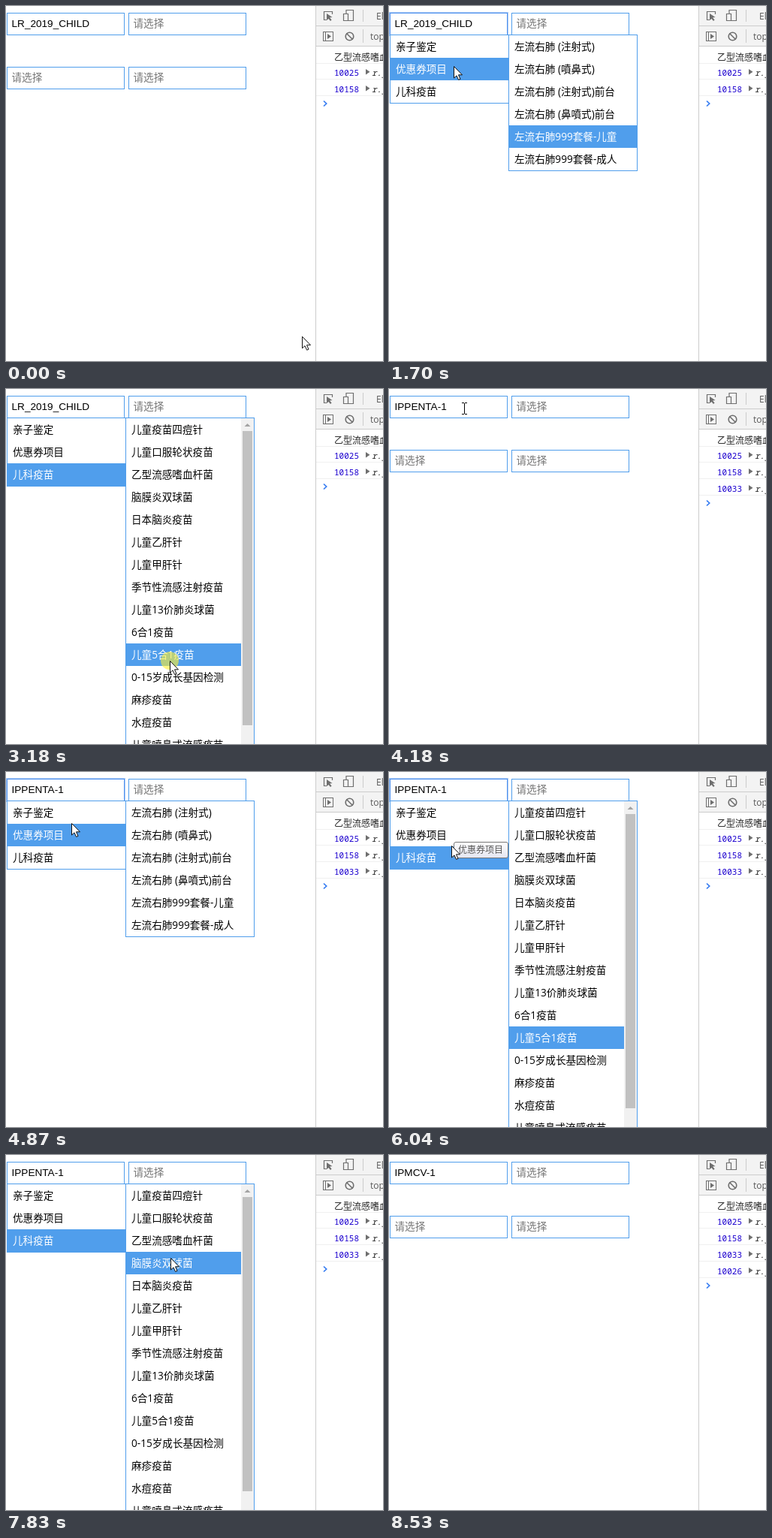
Animation of 502 by 473 pixels, one loop 9470 ms. Source, as an HTML page with a canvas:

```html
<!DOCTYPE html>
<html lang="zh-CN">
<head>
<meta charset="utf-8">
<title>Cascading select</title>
<style>
  html, body { margin: 0; width: 100%; height: 100%; overflow: hidden; background: #fff; }
  canvas { display: block; }
</style>
</head>
<body>
<canvas id="stage" width="502" height="473"></canvas>
<script>
const ctx = document.getElementById('stage').getContext('2d');
const LOOP = 9470, TICK = 77, ROW = 30, MENU_TOP = 38;
const BLUE = '#509eec', INK = '#6e6e6e', RULE = '#ccc';
const UI = '"Open Sans", "Noto Sans CJK SC", "Noto Sans CJK", sans-serif';
const ITEM_FONT = '13.6px ' + UI;
const FIELD_FONT = '13.6px "Liberation Sans", "Noto Sans CJK SC", "Noto Sans CJK", sans-serif';
const SMALL_FONT = '12px ' + UI;
const MONO = '11px "Noto Sans Mono", monospace';

const groups = ['亲子鉴定', '优惠券项目', '儿科疫苗'];
const children = [
  [],
  ['左流右肺 (注射式)', '左流右肺 (噴鼻式)', '左流右肺 (注射式)前台',
   '左流右肺 (鼻噴式)前台', '左流右肺999套餐-儿童', '左流右肺999套餐-成人'],
  ['儿童疫苗四痘针', '儿童口服轮状疫苗', '乙型流感嗜血杆菌', '脑膜炎双球菌', '日本脑炎疫苗',
   '儿童乙肝针', '儿童甲肝针', '季节性流感注射疫苗', '儿童13价肺炎球菌', '6合1疫苗', '儿童5合1疫苗',
   '0-15岁成长基因检测', '麻疹疫苗', '水痘疫苗', '儿童喷鼻式流感疫苗']
];
const picks = [
  { code: 'LR_2019_CHILD', item: '左流右肺999套餐-儿童' },
  { code: 'IPPENTA-1', item: '儿童5合1疫苗' },
  { code: 'IPMCV-1', item: '脑膜炎双球菌' }
];
const logged = ['10025', '10158', '10033', '10026'];

// Each session opens the menu, then closes it with a new pick.
const sessions = [
  { open: 1100, close: 3410 },
  { open: 4490, close: 7930, tipFrom: 7130, tipTo: 7680 }
];
const groupTip = { from: 5400, to: 6420 };

// Pointer glides: first step, last step, destination
const glides = [
  [70, 390, 82, 40], [540, 680, 86, 23], [1700, 1700, 86, 80], [1800, 2020, 102, 167],
  [2170, 2860, 218, 362], [3560, 4180, 100, 25], [4640, 4930, 86, 73], [5640, 5720, 83, 96],
  [6040, 6040, 83, 98], [6420, 6830, 219, 137], [8380, 8455, 334, 403]
];
const POINTER_GONE = 8530;

const within = (t, from, to) => t >= from && t < to;

function pointerAt(t) {
  let x = 394, y = 440;
  for (const [start, end, toX, toY] of glides) {
    if (t < start) break;
    const steps = Math.round((end - start) / TICK) + 1;
    const gap = (end - start) / (steps - 1) || 1;
    const p = Math.min(1, (Math.floor((t - start) / gap + 1e-6) + 1) / steps);
    const eased = p * p * (3 - 2 * p);
    x += (toX - x) * eased;
    y += (toY - y) * eased;
  }
  return { x: Math.round(x), y: Math.round(y) };
}

const rowAt = y => Math.floor((y - MENU_TOP) / ROW);

// The last group the pointer crossed since the menu opened stays active.
function activeGroup(opened, t) {
  let group = -1;
  for (let s = opened; s < t + 10; s += 10) {
    const { x, y } = pointerAt(Math.min(s, t));
    if (x < 160 && rowAt(y) in groups) group = rowAt(y);
  }
  return group;
}

function rect(x, y, w, h, color) {
  ctx.fillStyle = color;
  ctx.fillRect(x, y, w, h);
}

function frame(x, y, w, h, color) {
  ctx.strokeStyle = color;
  ctx.lineWidth = 1;
  ctx.strokeRect(x + 0.5, y + 0.5, w - 1, h - 1);
}

function label(text, x, y, font, color) {
  ctx.font = font;
  ctx.fillStyle = color;
  ctx.fillText(text, x, y);
}

function shape(path, x, y, fill, stroke, width = 1) {
  const outline = new Path2D(path);
  ctx.save();
  ctx.translate(x, y);
  if (fill) { ctx.fillStyle = fill; ctx.fill(outline); }
  if (stroke) { ctx.strokeStyle = stroke; ctx.lineWidth = width; ctx.stroke(outline); }
  ctx.restore();
}

function drawField(x, y, text, hasFocus) {
  frame(x, y, 157, 30, BLUE);
  if (hasFocus) {
    frame(x - 1, y - 1, 159, 32, '#a9c9f5');
    frame(x, y, 157, 30, '#4d90ee');
  }
  label(text || '请选择', x + 6.5, y + 19, FIELD_FONT, text ? '#000' : '#757575');
}

function drawMenu(x, w, items, active, textX) {
  const scrolls = items.length * ROW + MENU_TOP > 473;
  const h = items.length * ROW + 2;
  rect(x, MENU_TOP, w, h, '#fff');
  items.forEach((item, i) => {
    const y = MENU_TOP + 1 + i * ROW;
    if (i === active) rect(x + 1, y, w - (scrolls ? 18 : 2), ROW, BLUE);
    label(item, textX, y + 20, ITEM_FONT, i === active ? '#fff' : '#000');
  });
  if (scrolls) {
    rect(313, 39, 17, 434, '#f1f1f1');
    rect(315, 56, 13, 392, '#c1c1c1');
    shape('M-4 4 L0 0 L4 4Z', 321.5, 46, '#a3a3a3');
  }
  frame(x, MENU_TOP, w, h, BLUE);
}

function drawMenus(group, pick, pointer) {
  drawMenu(1, 159, groups, group, 9);
  if (group < 1) return;
  const items = children[group];
  const active = pointer.x >= 160 ? rowAt(pointer.y) : items.indexOf(pick.item);
  drawMenu(159, 172, items, active, 167);
}

function drawToolbar() {
  rect(413, 0, 89, 53, '#f3f3f3');
  rect(413, 26, 89, 1, RULE);
  rect(413, 53, 89, 1, RULE);
  rect(475, 5, 1, 16, RULE);
  rect(475, 31, 1, 18, RULE);
  // Inspect
  shape('M4 11.5H.5V.5H11.5V4', 423, 7, null, INK, 1.2);
  shape('M0 0V9L2.5 7L5 10L6.6 8.6L4 5.6L7.5 5Z', 427, 10, INK);
  // Devices
  shape('M.5 5.5H6.5V14.5H.5Z M4 5V.5H13.5V14.5H7', 449, 5, null, INK, 1.2);
  // Sidebar toggle
  frame(422, 34, 14, 13, INK);
  rect(425, 34, 1, 13, INK);
  shape('M0 0L5 3.5L0 7Z', 428, 37, INK);
  // Clear
  ctx.beginPath();
  ctx.arc(457.5, 40.5, 5.3, 0, Math.PI * 2);
  ctx.strokeStyle = INK;
  ctx.lineWidth = 1.6;
  ctx.stroke();
  shape('M-4 -4L4 4', 457.5, 40.5, null, INK, 1.6);
  label('Elements', 493, 18, SMALL_FONT, '#5a5a5a');
  label('top', 485, 45, SMALL_FONT, '#5a5a5a');
}

function drawConsole(count) {
  drawToolbar();
  label('乙型流感嗜血杆菌', 437, 72.5, SMALL_FONT, '#222');
  rect(413, 76, 89, 1, '#f0f0f0');
  for (let i = 0; i < count; i++) {
    const y = 93 + i * 22;
    label(logged[i], 437, y, MONO, '#1c00cf');
    shape('M0 0L5.5 3.8L0 7.5Z', 479, y - 9, INK);
    label('r.j', 487, y, 'italic ' + MONO, '#222');
    rect(413, y + 4, 89, 1, '#f0f0f0');
  }
  shape('M0 -3.5L3.7 0L0 3.5', 423, 86 + count * 22, null, '#367cf1', 1.7);
  rect(412, 0, 1, 473, RULE);
}

function drawTip(text, x, y) {
  ctx.font = SMALL_FONT;
  const w = Math.round(ctx.measureText(text).width) + 13;
  const fill = ctx.createLinearGradient(0, y, 0, y + 22);
  fill.addColorStop(0, '#fff');
  fill.addColorStop(1, '#e4e5f0');
  ctx.beginPath();
  ctx.roundRect(x + 0.5, y + 0.5, w - 1, 21, 2.5);
  ctx.fillStyle = fill;
  ctx.fill();
  ctx.strokeStyle = '#767676';
  ctx.lineWidth = 1;
  ctx.stroke();
  label(text, x + 6, y + 15, SMALL_FONT, '#575757');
}

function overField({ x, y }, menuOpen) {
  const inColumn = within(x, 1, 158) || within(x, 163, 320);
  return inColumn && (within(y, 9, 38) || (!menuOpen && within(y, 81, 111)));
}

function drawPointer({ x, y }, asText, isPressed) {
  if (isPressed) {
    ctx.beginPath();
    ctx.arc(x, y, 12, 0, Math.PI * 2);
    ctx.fillStyle = 'rgba(255, 240, 50, 0.6)';
    ctx.fill();
  }
  if (asText) {
    shape('M-3 -6.5H0M1 -6.5H4M-3 8.5H0M1 8.5H4M.5 -6V8', x, y, null, '#000');
  } else {
    shape('M.5 .5V16L4 12.8L6.6 18.4L9 17.4L6.5 11.8H11.5Z', x, y, '#fff', '#111');
  }
}

function draw(t) {
  const done = sessions.filter(s => t >= s.close).length;
  const pick = picks[done];
  const pointer = pointerAt(t);
  const current = sessions.find(s => within(t, s.open, s.close));
  const isFocused = sessions.some(s => within(t, s.open - 80, s.close - 250));
  const isPressed = sessions.some(s =>
    within(t, s.open - 250, s.open - 80) || within(t, s.close - 290, s.close - 100));

  rect(0, 0, 502, 473, '#fff');
  drawField(163, 9);
  drawField(1, 81);
  drawField(163, 81);
  drawField(1, 9, pick.code, isFocused);
  if (current) drawMenus(activeGroup(current.open, t), pick, pointer);
  drawConsole(2 + done);
  if (within(t, groupTip.from, groupTip.to)) drawTip(groups[1], 86, 93);
  if (current && within(t, current.tipFrom, current.tipTo)) {
    drawTip(picks[done + 1].code, pointer.x, pointer.y + 20);
  }
  if (t < POINTER_GONE) drawPointer(pointer, overField(pointer, current), isPressed);
}

const began = performance.now();
function tick() {
  draw((performance.now() - began) % LOOP);
  requestAnimationFrame(tick);
}
tick();
</script>
</body>
</html>
```
